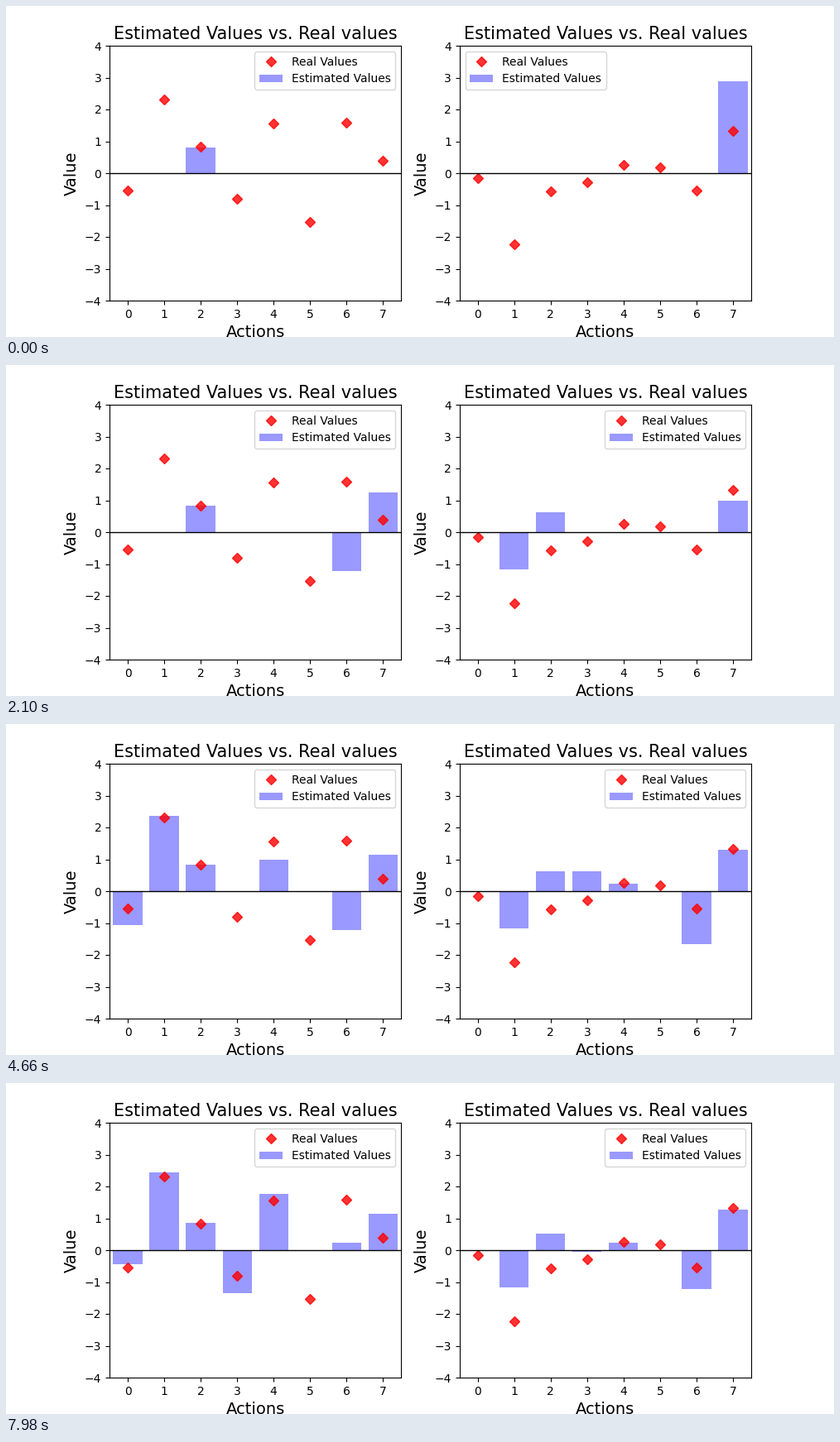
These frames come from a looping animation (1000x400 px, 8 s). A matplotlib script:

```python
import numpy as np
import matplotlib.pyplot as plt
from matplotlib.animation import FuncAnimation

LOOP_MS, STEP_MS = 8000, 100

LEFT_REAL = [-0.55, 2.31, 0.83, -0.80, 1.56, -1.53, 1.58, 0.39]
RIGHT_REAL = [-0.15, -2.23, -0.57, -0.28, 0.26, 0.18, -0.54, 1.32]

# Exploratory pulls: (second, action, new estimate).
LEFT_PULLS = [(0, 2, 0.81), (1.0, 2, 0.76), (1.3, 6, -1.22), (1.6, 2, 0.83),
              (3.1, 0, -1.06), (4.0, 4, 1.00), (4.9, 3, -1.35),
              (5.1, 4, 1.77), (5.4, 0, -0.43), (6.2, 2, 0.86),
              (7.4, 6, 0.24)]
RIGHT_PULLS = [(1.2, 1, -1.17), (2.0, 2, 0.62), (2.3, 6, -1.66),
               (2.5, 4, 0.24), (4.0, 3, 0.62), (5.4, 2, 0.52),
               (6.9, 3, -0.04), (7.5, 6, -1.22)]


def explored(pulls, t):
    values = np.zeros(8)
    for start, action, value in pulls:
        if t >= start:
            values[action] = value
    return values


def left_estimates(t):
    values = explored(LEFT_PULLS, t)
    if t >= 1.6:  # one lucky reward, then quick settling
        values[7] = 1.15 + 1.15 * np.exp(-(t - 1.6) / 0.2)
    if t >= 2.2:  # running average whose swings shrink as 1/t
        values[1] = 2.515 + 0.75 / t * np.cos(2 * np.pi * (t - 6.35) / 4.2)
    return values


def right_estimates(t):
    values = explored(RIGHT_PULLS, t)
    values[7] = 1.27 + 1.62 * np.exp(-t / 1.2) * np.cos(1.5 * t)
    return values


def make_panel(ax, real):
    actions = np.arange(8)
    points, = ax.plot(actions, real, "rD", alpha=0.8, label="Real Values")
    bars = ax.bar(actions, np.zeros(8), color="blue", alpha=0.4,
                  label="Estimated Values")
    ax.axhline(0, color="black", linewidth=1)
    ax.set(xlim=(-0.5, 7.5), ylim=(-4, 4), xticks=actions,
           yticks=range(-4, 5))
    ax.set_title("Estimated Values vs. Real values", fontsize=15)
    ax.set_xlabel("Actions", fontsize=14)
    ax.set_ylabel("Value", fontsize=14)
    legend = ax.legend(handles=[points, bars], loc="upper right")
    return bars, legend


plt.rcParams["font.family"] = "DejaVu Sans"
fig, (left_ax, right_ax) = plt.subplots(1, 2, figsize=(10, 4), dpi=100)
panels = [(*make_panel(left_ax, LEFT_REAL), left_estimates),
          (*make_panel(right_ax, RIGHT_REAL), right_estimates)]


def update(frame):
    t = frame * STEP_MS / 1000
    for bars, legend, estimates in panels:
        heights = estimates(t)
        for bar, height in zip(bars, heights):
            bar.set_height(height)
        # The legend moves aside for a tall last bar.
        legend.set_loc("upper left" if heights[7] > 2.6 else "upper right")


anim = FuncAnimation(fig, update, frames=LOOP_MS // STEP_MS,
                     interval=STEP_MS, repeat=True, repeat_delay=0)
plt.show()
```
